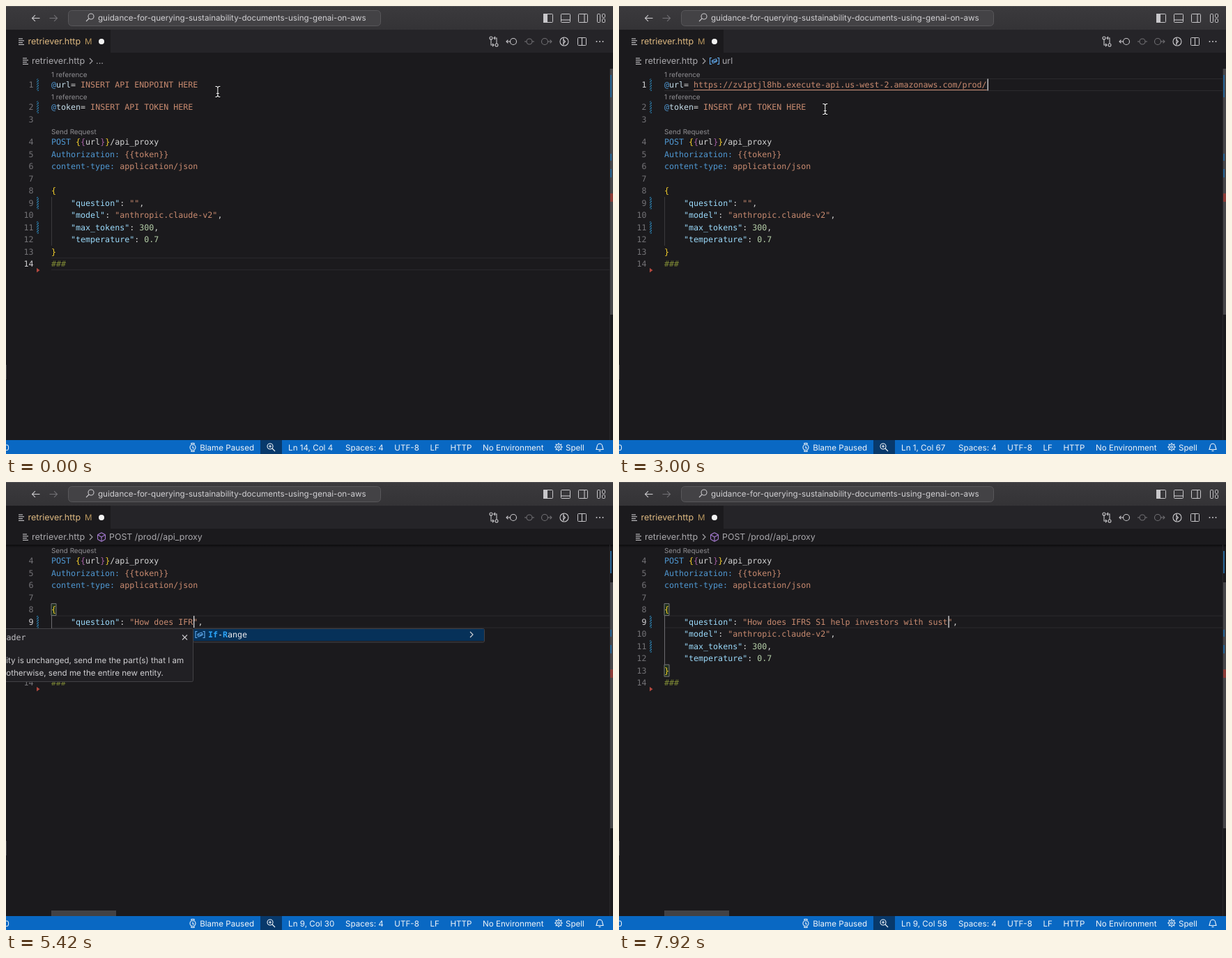
These frames come from a looping animation (871x643 px, 8 s). An HTML page with a canvas:

```html
<!DOCTYPE html>
<html lang="en">
<head>
<meta charset="utf-8">
<title>Editor</title>
<style>
html, body { margin: 0; width: 100%; height: 100%; overflow: hidden; background: #1b1a1d; }
canvas { display: block; }
</style>
</head>
<body>
<canvas id="stage" width="871" height="643"></canvas>
<script>
const g = document.getElementById('stage').getContext('2d');
const LOOP = 8000, LEFT = 65, CW = 7.015, ROW = 17.52, SCROLL = 82;
const MONO = '11.65px "DejaVu Sans Mono", monospace';
const ui = size => `${size}px Inter, sans-serif`;
const UI = ui(11.6);
const C = {
  str: '#c98b70', key: '#4f97d1', prop: '#9bdafb', num: '#b5cea8', fg: '#d4d4d4',
  gold: '#f5d02c', pink: '#a860a6', hash: '#7f8a36', icon: '#c8c7ca', off: '#706f73',
  crumb: '#a9a8ac', blue: '#62acf0', panel: '#212024', edge: '#434246', white: '#f0f4f8'
};
const QUESTION = 'How does IFRS S1 help investors with sust';
const URL_TEXT = 'https://zv1ptjl8hb.execute-api.us-west-2.amazonaws.com/prod/';

// Key times: [ms, characters typed] and [ms, x, y] of the pointer
const TYPED = [[4279, 0], [5370, 12], [6785, 24], [7910, 41]];
const POINTER = [[0, 304, 123], [330, 272, 113], [1080, 47, 97], [2420, 47, 97],
  [3000, 296, 148], [3170, 272, 146], [3750, 61, 140]];

const IF_LIST = ['If-Match', 'If-Modified-Since', 'If-None-Match', 'If-Range', 'If-Unmodified-Since'];
const H_LIST = ['HEAD', 'Host', 'X-Http-Method-Override'];
const HINTS = {
  H: H_LIST, Ho: ['Host'], d: ['Date', 'DELETE'], I: IF_LIST, IF: IF_LIST, IFR: ['If-Range'],
  S: ['Server', 'Set-Cookie'], h: H_LIST, he: ['HEAD'], i: IF_LIST,
  in: ['If-None-Match', 'If-Unmodified-Since', 'randomInt', 'If-Range', 'If-Modified-Since'],
  w: ['WWW-Authenticate'], wi: ['WWW-Authenticate']
};
const DOCS = {
  'Host': ['The domain name of the server, and the TCP port', 'number on which the server is listening'],
  'Date': ['The date and time that the message was sent'],
  'If-Match': ['Only perform the action if the client supplied entity', 'matches the same entity on the server'],
  'If-Range': ['If the entity is unchanged, send me the part(s) that I am', 'missing; otherwise, send me the entire new entity.'],
  'If-None-Match': ['Allows a 304 Not Modified to be returned if content is', 'unchanged for ETag'],
  'Server': ['A name for the server'],
  'WWW-Authenticate': ['Indicates the authentication scheme that should be', 'used to access the requested entity']
};

function at(keys, t, i) {
  const k = keys.findIndex(key => key[0] > t);
  if (k === 0) return keys[0][i];
  if (k < 0) return keys[keys.length - 1][i];
  const a = keys[k - 1], b = keys[k];
  return a[i] + (b[i] - a[i]) * (t - a[0]) / (b[0] - a[0]);
}
const typedAt = t => Math.floor(at(TYPED, t, 1));
const colX = col => LEFT + (col - 1) * CW;
const rowY = n => n === 1 ? 113 : n === 2 ? 145 : n === 3 ? 162.5 : 195 + (n - 4) * ROW;

function rect(x, y, w, h, fill) { g.fillStyle = fill; g.fillRect(x, y, w, h); }
function box(x, y, w, h, fill, edge, r = 0) {
  g.beginPath(); g.roundRect(x + .5, y + .5, w - 1, h - 1, r);
  if (fill) { g.fillStyle = fill; g.fill(); }
  if (edge) { g.strokeStyle = edge; g.lineWidth = 1; g.stroke(); }
}
function fade(y, h, from, to) {
  const shade = g.createLinearGradient(0, y, 0, y + h);
  shade.addColorStop(0, from); shade.addColorStop(1, to);
  rect(0, y, 871, h, shade);
}
function text(s, x, y, color, font = UI, align = 'left') {
  g.font = font; g.fillStyle = color; g.textAlign = align;
  g.fillText(s, x, y + 4.1);
}
function width(s, font = UI) { g.font = font; return g.measureText(s).width; }

// Each path is a flat list of x, y offsets from (x, y)
function lines(x, y, color, ...paths) {
  g.strokeStyle = color; g.lineWidth = 1.1; g.beginPath();
  for (const p of paths)
    for (let i = 0; i < p.length; i += 2) g[i ? 'lineTo' : 'moveTo'](x + p[i], y + p[i + 1]);
  g.stroke();
}
function ring(x, y, r, color) {
  g.beginPath(); g.arc(x, y, r, 0, 7); g.strokeStyle = color; g.lineWidth = 1.1; g.stroke();
}
function dot(x, y, r, color) {
  g.beginPath(); g.arc(x, y, r, 0, 7); g.fillStyle = color; g.fill();
}
const chevron = (x, y, color, dir = 1, r = 4) => lines(x, y, color, [-dir * r / 2, -r, dir * r / 2, 0, -dir * r / 2, r]);
function arrow(x, y, color, dir, r) {
  lines(x, y, color, [-dir * r, 0, dir * r, 0]);
  chevron(x + dir * r * .6, y, color, dir, r * .8);
}
function menuIcon(x, y) {
  [6, 8, 6, 8].forEach((w, i) => lines(x - 4, y - 4 + i * 2.8, C.icon, [0, 0, w, 0]));
}
function cubeIcon(x, y, color, r = 6.3) {
  for (let k = 0; k < 6; k++) {
    const p = j => [r * Math.sin(j * Math.PI / 3), r * Math.cos(j * Math.PI / 3)];
    lines(x, y, color, [...p(k), ...p(k + 1)]);
    if (k % 2 === 0) lines(x, y, color, [0, 0, ...p(k)]);
  }
}
function varIcon(x, y) {
  for (const d of [-1, 1]) lines(x, y, C.blue, [d * 4, -4.5, d * 6.5, -4.5, d * 6.5, 4.5, d * 4, 4.5]);
  g.save(); g.translate(x, y); g.rotate(-.45);
  box(-4, -2.5, 8, 5, null, C.blue, 1);
  g.restore();
  lines(x, y, C.blue, [-3, 0, 0, 1, 3, -1]);
}
function lens(x, y, color, side) {
  ring(x, y, 4, color);
  lines(x, y, color, [side * 3, 3, side * 7, 7]);
}

function topBar() {
  fade(0, 34, '#3b3a3d', '#343336');
  rect(0, 0, 871, 1, '#535255');
  arrow(43, 17.5, C.icon, -1, 5.5);
  arrow(68, 17.5, C.off, 1, 5.5);
  box(89, 6, 449, 23, '#434245', '#58575a', 5);
  lens(122, 15, C.icon, -1);
  text('guidance-for-querying-sustainability-documents-using-genai-on-aws', 132, 17, '#d0cfd2');
  for (let i = 0; i < 3; i++) box(771 + i * 25, 11, 14, 13, null, C.icon, 1);
  rect(771, 11, 6, 13, C.icon);
  lines(803, 20, C.icon, [-6, 0, 6, 0]);
  lines(830, 17, C.icon, [0, -6, 0, 6]);
  box(848, 11, 5, 13, null, C.icon, 1);
  for (const y of [11, 18]) box(855, y, 5, 6, null, C.icon, 1);

  const y = 51;
  rect(0, 34, 871, 33, '#252428');
  rect(0, 34, 150, 34, '#1b1a1d');
  menuIcon(22, y);
  text('retriever.http', 31.5, y, '#dfba82', ui(12.5));
  text('M', 113, y, '#b8965e');
  dot(137, y, 4, '#f2f2f2');

  for (const d of [-1, 1]) {
    ring(700 + d * 4, y + d * 5, 2, C.icon);
    lines(700, y, C.icon, [d * 4, d * 3, d * 4, -d * 5, 0, -d * 5]);
    chevron(700 + d, y - d * 5, C.icon, -d, 2);
  }
  ring(728, y, 4.5, C.icon); arrow(721, y, C.icon, -1, 3);
  ring(751, y, 4, C.off);
  for (const d of [-1, 1]) lines(751, y, C.off, [d * 4, 0, d * 7, 0]);
  ring(773, y, 4.5, C.off); arrow(780, y, C.off, 1, 3);
  ring(801, y, 6, C.icon); lines(801, y, C.icon, [-1, -6, -1, 5]); chevron(801, y, C.icon, 1, 3);
  box(820, 45, 13, 12, null, C.icon, 1); lines(826.5, y, C.icon, [0, -6, 0, 6]);
  for (let i = -1; i < 2; i++) dot(852 + i * 4.5, y, 1, C.icon);
}

function crumbs(s) {
  const name = { 1: 'url', 2: 'token', 9: 'POST /prod//api_proxy' }[s.line];
  menuIcon(28, 79);
  text('retriever.http', 37, 79, C.crumb, ui(12.6));
  chevron(122, 79, C.crumb);
  if (!name) return text('...', 129, 79, C.crumb, ui(12.6));
  if (s.line === 9) cubeIcon(137, 79, '#a57ad0'); else varIcon(137, 79);
  text(name, 148, 79, C.crumb, ui(12.4));
}

const field = (name, ...rest) => [[C.fg, '    '], [C.prop, `"${name}"`], [C.fg, ': '], ...rest];
const variable = (name, value) => [[C.key, '@'], ['#c4dce9', name], [C.fg, '= '], [C.str, value]];
function codeRows(s) {
  return [
    variable('url', s.pasted ? URL_TEXT : 'INSERT API ENDPOINT HERE'),
    variable('token', 'INSERT API TOKEN HERE'),
    [],
    [[C.key, 'POST '], [C.gold, '{'], [C.pink, '{'], [C.fg, 'url'], [C.pink, '}'], [C.gold, '}'], [C.fg, '/api_proxy']],
    [[C.key, 'Authorization: '], [C.str, '{{token}}']],
    [[C.key, 'content-type: '], [C.str, 'application/json']],
    [],
    [[C.gold, '{']],
    field('question', [C.str, `"${QUESTION.slice(0, s.typed)}"`], [C.fg, ',']),
    field('model', [C.str, '"anthropic.claude-v2"'], [C.fg, ',']),
    field('max_tokens', [C.num, '300'], [C.fg, ',']),
    field('temperature', [C.num, '0.7']),
    [[C.gold, '}']],
    [[C.hash, '###']]
  ];
}

function hatch(y) {
  g.save();
  g.beginPath(); g.rect(44, y - 8.5, 3, ROW); g.clip();
  for (let k = -9; k < 13; k += 3.5) lines(44, y + k, '#2b7fae', [-1, 3, 4, -2]);
  g.restore();
}

function codeLine(parts, n, s) {
  const y = rowY(n);
  let col = 1;
  for (const [color, str] of parts) {
    text(str, colX(col), y, color, MONO);
    for (const ch of str) {
      if (ch === ' ' && n === s.line && col >= s.col && col < s.end) dot(colX(col + .5), y, .7, '#7d8fa3');
      col++;
    }
  }
  text(n, 39.5, y, n === s.line ? '#d2d1d4' : '#737276', MONO, 'right');
  if ([1, 2, 9, 11].includes(n)) hatch(y);
}

function editor(s) {
  const low = s.line === 9, y = rowY(s.line), sel = s.end - s.col;
  g.save();
  g.beginPath(); g.rect(0, 90, 867, 533); g.clip();
  if (low) g.translate(0, -SCROLL);
  if (sel) box(colX(s.col), y - 9, sel * CW + 1, 18, '#214d7a', null, 2);
  else for (const d of [-9, 8]) rect(LEFT, y + d, 802, 1, '#2b2a2d');
  rect(LEFT, 274, 1, 70, low ? '#6d6c70' : '#3a393c');
  if (low) for (const n of [8, 13]) box(LEFT - .5, rowY(n) - 9, 8, 18, '#20301f', '#77767a');

  const note = (label, ny) => text(label, LEFT, ny, '#8f8e92', ui(9.85));
  note('1 reference', 98);
  note('1 reference', 130);
  note('Send Request', 180);
  codeRows(s).forEach((parts, i) => codeLine(parts, i + 1, s));
  if (s.underline) rect(colX(7), 120, URL_TEXT.length * CW, 1, C.str);
  g.fillStyle = '#b3483f';
  g.beginPath(); g.moveTo(44, 376); g.lineTo(48.5, 379.3); g.lineTo(44, 382.6); g.fill();
  if (s.caret) rect(colX(s.col) + .6, y - 8.5, 1.3, 17, '#d8d8da');
  g.restore();

  if (low) {
    fade(90, 4, '#0c0c0d', 'rgba(12,12,13,0)');
    rect(LEFT, 615, 93, 8, '#434245');
  }
  rect(866, 90, 1, 533, '#29282b');
  rect(867, low ? 144 : 90, 4, 353, '#48474a');
  for (const [my, h] of [[99, 32], [212, 10], [234, 12]]) rect(867, my, 2, h, '#266596');
  rect(867, 269, 4, 12, '#8c3c38');
  rect(0, 515, 1, 21, '#444347');
}

// Fuzzy match: the letters of the typed word light up in order
function hintLabel(str, word, x, y, first) {
  let k = 0;
  [...str].forEach((ch, i) => {
    const hit = k < word.length && ch.toLowerCase() === word[k].toLowerCase();
    if (hit) k++;
    text(ch, x + i * CW, y, hit ? '#2ba4f8' : first ? '#eeeef0' : '#cfced1', (hit ? 'bold ' : '') + MONO);
  });
}

function popup(s) {
  const word = QUESTION.slice(0, s.typed).split(' ').pop();
  const items = HINTS[word];
  if (!items) return;
  const x = Math.round(colX(s.col)), left = x - 321, doc = DOCS[items[0]] || [];
  box(left, 210, 322, 36 + (doc.length ? 6 + doc.length * ROW : 0), C.panel, C.edge, 2);
  text(items[0] === 'HEAD' ? 'HTTP Method' : 'HTTP Header', left + 4.5, 223, '#bfbec2', MONO);
  doc.forEach((str, i) => text(str, left + 4.5, 256 + i * ROW, '#cfced1'));
  for (const d of [-1, 1]) lines(x - 11.5, 223, C.icon, [-3.5, -3.5 * d, 3.5, 3.5 * d]);

  box(x, 210, 419, items.length * ROW + 3, C.panel, C.edge, 2);
  rect(x + 1, 211, 417, 17, '#063159');
  items.forEach((str, i) => {
    const y = 219 + i * ROW;
    if (str === 'randomInt') cubeIcon(x + 10, y, C.blue); else varIcon(x + 10.5, y);
    hintLabel(str, word, x + 22, y, !i);
  });
  chevron(x + 400, 219, '#d8d8da');
}

function statusBar(s) {
  const y = 633.5, sel = s.end - s.col;
  rect(0, 623, 871, 20, '#0968c3');
  text('0', -2.5, y, C.white);
  const pos = `Ln ${s.line}, Col ${s.shownCol}` + (sel ? ` (${sel} selected)` : '');
  // Digits all take the same room, so the bar stays still while counting
  const x = 471.5 - width(pos.replace(/\d/g, '0')), cell = Math.round(x - 40);
  text(pos, x, y, C.white);
  rect(cell, 623, 31, 20, '#08396b');
  lens(cell + 14, 632, C.white, 1);
  lines(cell + 14, 632, C.white, [-2, 0, 2, 0], [0, -2, 0, 2]);
  if (s.blame) {
    text('Blame Paused', cell - 9, y, C.white, UI, 'right');
    ring(cell - 97, y, 4, C.white);
    lines(cell - 97, y, C.white, [0, -2, 0, 1, 2, 1]);
    for (const d of [-1, 1]) lines(cell - 97, y, C.white, [-2, d * 4, -2, d * 6, 2, d * 6, 2, d * 4]);
  }
  let next = 487;
  for (const str of ['Spaces: 4', 'UTF-8', 'LF', 'HTTP', 'No Environment']) {
    text(str, next, y, C.white);
    next += width(str) + 15.6;
  }
  text('Spell', 803, y, C.white);
  for (const r of [1.5, 4]) ring(793, 633, r, C.white);
  for (let a = 0; a < 6; a += Math.PI / 4)
    lines(793, 633, C.white, [Math.cos(a) * 4, Math.sin(a) * 4, Math.cos(a) * 6, Math.sin(a) * 6]);
  g.beginPath();
  g.arc(852, 632, 3.7, Math.PI, 0);
  g.lineTo(857, 636.5); g.lineTo(847, 636.5); g.closePath(); g.stroke();
  lines(852, 638.5, C.white, [-1.5, 0, 1.5, 0]);
}

function pointer(x, y) {
  for (const [shift, color] of [[.8, '#000'], [0, '#f4f4f4']]) {
    lines(x + shift, y + shift, color, [0, -6, 0, 6], [-2, 2.5, 2, 2.5]);
    for (const d of [-1, 1]) lines(x + shift, y + shift, color, [-3.5, d * 7.5, -1.5, d * 7.5, 0, d * 6, 1.5, d * 7.5, 3.5, d * 7.5]);
  }
}

function stateAt(t) {
  const mx = at(POINTER, t, 1), my = at(POINTER, t, 2), typed = typedAt(t);
  const during = (a, b) => t >= a && t < b;
  const drag = end => Math.max(1, Math.min(end, Math.round((mx - LEFT) / CW) + 1));
  const s = { mx, my, typed, pasted: t >= 1590, underline: t >= 2580, caret: true };
  s.blame = t < 330 || during(800, 1590) || during(2420, 3170) || during(3500, 4090) || t >= 4830;
  const put = (line, end, col = end) => Object.assign(s, { line, end, col, shownCol: col });
  if (t < 330) { put(14, 4); s.caret = false; }
  else if (t < 1590) put(1, 31, drag(31));
  else if (t < 3170) { put(1, 67); s.caret = (t - 1590) % 1000 < 500; }
  else if (t < 4090) put(2, 30, drag(30));
  else {
    put(9, 18 + typed);
    s.shownCol = 18 + typedAt(t - 40);
    s.caret = typed !== 24;
  }
  return s;
}

function draw() {
  const s = stateAt(performance.now() % LOOP);
  g.textRendering = 'geometricPrecision';
  rect(0, 0, 871, 643, '#1b1a1d');
  topBar();
  crumbs(s);
  editor(s);
  popup(s);
  statusBar(s);
  if (s.line !== 9) pointer(s.mx, s.my);
  requestAnimationFrame(draw);
}
draw();
</script>
</body>
</html>
```
